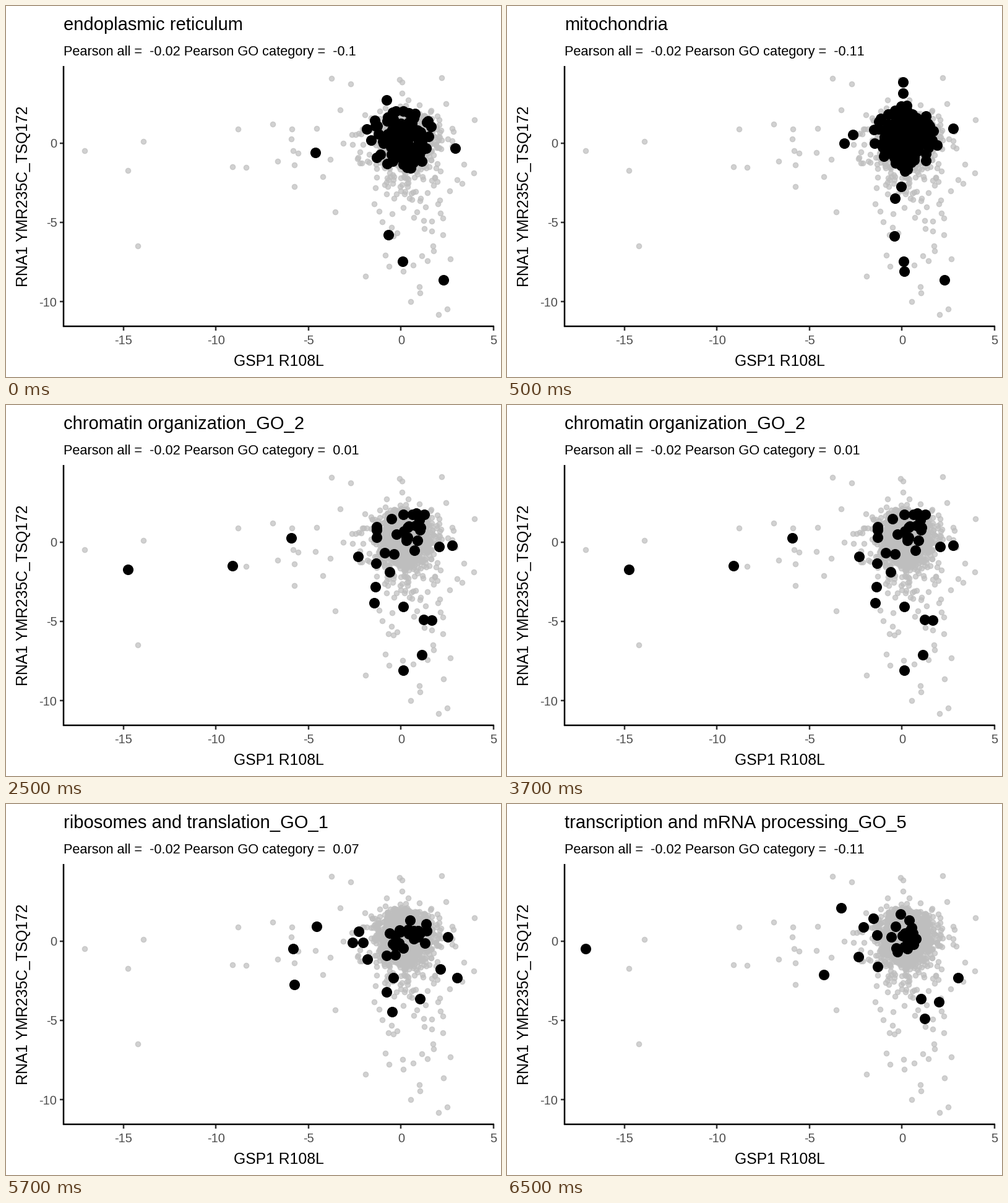
A matplotlib script that plays this animation: 800x600 px, repeating every 8000 ms.

```python
import matplotlib.pyplot as plt
import numpy as np
from matplotlib.animation import FuncAnimation

W, H, DPI = 800, 600, 100
PX = 72 / DPI  # points per pixel

plt.rcParams["font.family"] = "Liberation Sans"
plt.rcParams["text.kerning_factor"] = 6
rng = np.random.default_rng(12)


def cloud(count, center, spread, reach=2.3):
    """Normal cloud without the points beyond `reach` deviations."""
    unit = rng.normal(size=(count, 2))
    return center + unit[np.hypot(*unit.T) < reach] * spread


def category(name, pearson, count, center, spread, isolated):
    """Title, correlation and genes: a cloud plus a few isolated ones."""
    genes = np.vstack([cloud(count, center, spread), isolated])
    return name, pearson, genes


# Positions are in stage pixels, y pointing down.
categories = [
    category("endoplasmic reticulum", "-0.1", 140, (640, 214), (26, 23),
             [(500, 237), (615, 152), (726, 230), (618, 370), (641, 413),
              (707, 443)]),
    category("mitochondria", "-0.11", 230, (642, 214), (25, 24),
             [(640, 123), (640, 141), (545, 222), (559, 208), (721, 198),
              (637, 292), (627, 311), (626, 372), (641, 413), (642, 429),
              (707, 443)]),
    category("chromatin organization_GO_2", "0.01", 28, (644, 219), (28, 27),
             [(197, 266), (366, 260), (461, 215), (569, 245), (721, 227),
              (597, 294), (595, 320), (642, 326), (675, 347), (688, 348),
              (672, 404), (642, 429)]),
    category("ribosomes and translation_GO_1", "0.07", 26,
             (650, 217), (32, 14),
             [(502, 198), (464, 234), (466, 292), (570, 206), (560, 224),
              (577, 224), (584, 251), (626, 281), (615, 304), (624, 336),
              (669, 315), (702, 267), (729, 281)]),
    category("transcription and mRNA processing_GO_5", "-0.11", 23,
             (640, 211), (26, 15),
             [(127, 234), (540, 168), (512, 276), (568, 247), (576, 199),
              (592, 185), (599, 263), (729, 281), (669, 315), (698, 320),
              (675, 347)]),
]

outliers = [
    (222, 219), (213, 388), (375, 199), (431, 191), (388, 261), (439, 251),
    (462, 199), (472, 238), (466, 257), (524, 248), (532, 333), (526, 117),
    (557, 126), (636, 119), (704, 116), (711, 158), (757, 184), (756, 270),
    (740, 256), (737, 287), (717, 299), (706, 370), (713, 490), (699, 499),
    (654, 478), (669, 464), (668, 454), (681, 412), (613, 403), (581, 437)]
tail = np.column_stack([rng.normal(657, 28, 48),
                        275 + np.minimum(rng.exponential(42, 48), 150)])
genes = np.unique(np.vstack(
    [outliers, tail, cloud(560, (645, 217), (24, 22)),
     cloud(230, (642, 219), (37, 30))] + [c[2] for c in categories]), axis=0)

fig = plt.figure(figsize=(W / DPI, H / DPI), dpi=DPI, facecolor="white")
ax = fig.add_axes([0, 0, 1, 1])
ax.set(xlim=(0, W), ylim=(H, 0))
ax.axis("off")


def label(x, y, text, size, color="black", **kw):
    return ax.text(x, y, text, fontsize=size * PX, color=color, **kw)


def line(xs, ys, color="black"):
    ax.plot(xs, ys, color=color, lw=2.5 * PX, solid_capstyle="butt")


def dots(xy, radius, color):
    return ax.scatter(*xy.T, s=(2 * radius * PX) ** 2, facecolor=color,
                      edgecolor=color, lw=1.48 * PX)


def x_pixel(value):
    return 638.4 + 29.92 * value


def y_pixel(value):
    return 221.5 - 25.64 * value


dots(genes, 4.07, (190 / 255,) * 3 + (0.7,))
marked = dots(categories[0][2], 7.8, "black")

for v in range(-15, 6, 5):
    line([x_pixel(v)] * 2, [518, 524.5], "#333333")
    label(x_pixel(v), 547, str(v), 20, "#4d4d4d", ha="center")
for v in (0, -5, -10):
    line([87.3, 93.6], [y_pixel(v)] * 2, "#333333")
    label(82.5, y_pixel(v) + 7.6, str(v), 20, "#4d4d4d", ha="right")
line([93.4, 93.4], [97, 519])
line([92.2, 789], [517.6, 517.6])

label(440.5, 582, "GSP1 R108L", 24.7, ha="center")
label(35.5, 307.5, "RNA1 YMR235C_TSQ172", 24.7, rotation=90,
      rotation_mode="anchor", ha="center", va="baseline")
title = label(93, 39, "", 29.15)
subtitle = label(92.8, 80, "", 21.75)


def update(i):
    name, pearson, xy = categories[(i + 3) // 4]
    title.set_text(name)
    subtitle.set_text(
        f"Pearson all =  -0.02 Pearson GO category =  {pearson}")
    marked.set_offsets(xy)
    return title, subtitle, marked


anim = FuncAnimation(fig, update, frames=16, interval=500, repeat=True)
plt.show()
```
